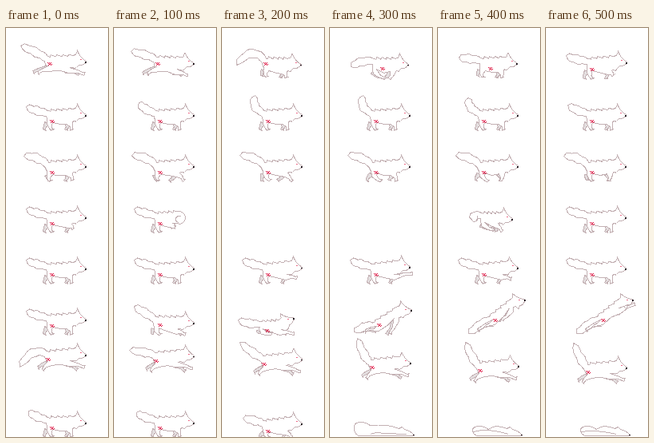
An HTML page for the animation above (0.6 s loop, 128x512 px).

```html
<!DOCTYPE html>
<html lang="en">
<head>
<meta charset="utf-8">
<title>Wolf moves</title>
<style>
html, body { margin: 0; width: 100%; height: 100%; overflow: hidden; background: #fff; }
svg { display: block; width: 128px; height: 512px; shape-rendering: crispEdges; }
.line { fill: #fff; stroke: #c3b0b3; stroke-width: 1; }
.far { fill: #e4dfe0; }
.open { fill: none; }
.mark { fill: none; stroke: #dc0d3c; stroke-width: 1; }
.nose { fill: #2a2228; }
.eye { fill: #ee6a88; }
</style>
</head>
<body>
<svg id="stage" viewBox="0 0 128 512"></svg>
<script>
const STEP = 100, STEPS = 6, CELL = 64;
const stage = document.getElementById("stage");

const add = (a, b, k = 1) => [a[0] + b[0] * k, a[1] + b[1] * k];
const mix = (a, b, t) => add(a, add(b, a, -1), t);
const unit = ([x, y]) => { const l = Math.hypot(x, y) || 1; return [x / l, y / l]; };
const side = ([x, y]) => [y, -x];
const ease = t => t * t * (3 - 2 * t);
const wave = t => Math.sin(Math.PI * t) ** 2;
const range = (n, f) => Array.from({ length: n }, (_, k) => f(k));

// Head outline from nape to throat, measured from the nose.
const HEAD = [[-17, -9], [-13, -10], [-11, -15], [-9, -11], [-7, -8], [-3, -4], [0, -2], [0, 0], [-5, 3], [-9, 3], [-12, 6]];

function turn([x, y], [nx, ny, deg = 0]) {
  const a = deg * Math.PI / 180, c = Math.cos(a), s = Math.sin(a);
  return [nx + x * c - y * s, ny + x * s + y * c];
}

const arc = (c, r, from, to) => range(13, k => turn([r, 0], [...c, from + (to - from) * k / 12]));

function shape(points, tag = "polygon", extra = "") {
  const list = points.map(p => p.map(v => v.toFixed(1)).join()).join(" ");
  return `<${tag} class="line ${extra}" points="${list}"/>`;
}

// One limb: down the front edge, round the paw, up the back edge.
function leg(top, foot, bend) {
  const out = side(unit(add(foot, top, -1)));
  const knee = add(mix(top, foot, .55), out, bend);
  return [add(top, out, 3), add(knee, out, 1.5), add(mix(knee, foot, .7), out, .8), add(foot, out, 2),
    add(foot, out, -2), add(knee, out, -2), add(top, out, -4)];
}

// Bushy tail: lower edge to the tip, then the upper edge back to the rump.
function brush(base, bend, tip) {
  const edge = s => range(10, k => {
    const t = k / 10;
    const a = mix(base, bend, t), b = mix(bend, tip, t);
    const width = 3.7 + 2 * Math.sin(Math.PI * t) - t + .7 * Math.sin(t * 17 + s);
    return add(mix(a, b, t), side(unit(add(b, a, -1))), s * width);
  });
  return [...edge(1), tip, ...edge(-1).reverse()];
}

function fur(a, b, up) {
  const tufts = range(4, k => {
    const p = mix(a, b, (k + .6) / 4.4);
    return [add(p, up, -1), add(add(p, [1, 0]), up, 1.6)];
  });
  return tufts.flat();
}

function stamp([x, y]) {
  const at = `${Math.round(x)} ${Math.round(y)}`;
  return `<path class="mark" d="M${at}m-2 -2l2 2l-2 2m2 -1l2 -3m-1 4l2 -2m-3 -2l1 1"/>`;
}

function face(nose) {
  const [ex, ey] = turn([-7, -4], nose);
  return `<rect class="nose" x="${nose[0] - 1.5}" y="${nose[1] - 1.5}" width="2" height="1.5"/>` +
    `<rect class="eye" x="${ex - .5}" y="${ey - .5}" width="2" height="1"/>`;
}

// Feet are near front, far front, near hind, far hind.
const REST = {
  hip: [55, 47], chest: [80, 47], nose: [100, 46], thick: 8,
  tip: [25, 34], bend: [38, 40],
  feet: [[82, 63], [75, 63], [58, 63], [48, 63]]
};

function wolf(change = {}) {
  const { hip, chest, nose, thick, tip, bend, feet, head, mark } = { ...REST, ...change };
  const along = unit(add(chest, hip, -1)), up = side(along);
  const front = add(chest, up, -thick), rear = add(hip, up, -thick);
  const rump = add(add(hip, up, thick - 3), along, -4);
  const crown = head || HEAD.map(p => turn(p, nose));
  const outline = [
    ...crown,
    add(add(chest, along, 7), up, -thick * .7), add(add(chest, along, 4), up, -thick * .6),
    ...leg(front, feet[0], 1),
    add(mix(front, rear, .5), up, -1),
    ...leg(rear, feet[2], -1.5),
    add(add(hip, along, -4), up, -thick * .5),
    ...brush(rump, bend, tip),
    ...fur(add(rump, up, 3), crown[0], up)
  ];
  return shape(leg(add(front, along, -3), feet[1], 1), "polygon", "far") +
    shape(leg(add(rear, along, -3), feet[3], -1.5), "polygon", "far") +
    shape(outline) + (head ? "" : face(nose)) +
    (mark === null ? "" : stamp(mark || add(hip, [2, 6])));
}

const withPaw = paw => ({ feet: [paw, ...REST.feet.slice(1)] });

function run(i) {
  if (i === 5) return wolf({ ...withPaw([84, 59]), nose: [101, 44], hip: [55, 46] });
  const g = wave(i / 6);
  const nose = [100 - 2 * g, 43 + 4 * Math.sin(Math.PI * i / 5)];
  const front = 98 - 24 * g, hind = 40 + 28 * g * g, ground = 57 + 6 * g;
  return wolf({
    nose, hip: [54 + 3 * g, 43 + 3 * g], chest: [79, nose[1] + 1],
    tip: [[18, 22], [21, 29], [18, 46], [26, 48], [26, 37]][i],
    bend: [36, i === 2 ? 20 : 28 + 12 * g],
    feet: [[front, ground], [front - 7, ground], [hind, ground - 1], [hind - 6, ground - 2]],
    mark: i < 3 ? [54, 45] : [65, 51]
  });
}

function wag(i) {
  const lift = Math.min(1, 1.3 * wave(i / 5.6));
  return wolf({ tip: mix([25, 34], [41, 20], lift), bend: mix([38, 40], [36, 35], lift) });
}

function walk(i) {
  const pace = (x, phase) => {
    const a = 2 * Math.PI * (i / STEPS + phase);
    return [x + 5 * Math.sin(a), 63 - Math.max(0, Math.cos(a))];
  };
  return wolf({
    tip: [22, 32 - Math.sin(Math.PI * i / 5)], bend: [38, 31],
    feet: [pace(83, 0), pace(74, .5), pace(59, .7), pace(51, .2)]
  });
}

function vanish(i) {
  if (i === 0) return wolf(withPaw([84, 59]));
  if (i === 1) {
    const hidden = [[76, 54], [76, 54]];
    return wolf({ head: arc([81, 45], 8, -110, 90), chest: [74, 47], feet: [...hidden, ...REST.feet.slice(2)] }) +
      shape(arc([81, 47], 4, 90, 300), "polyline", "open");
  }
  if (i < 4) return "";
  if (i === 5) return wolf();
  return wolf({
    hip: [57, 46], chest: [73, 47], nose: [93, 48], thick: 7, tip: [49, 48], bend: [38, 42],
    feet: [[80, 62], [73, 62], [70, 60], [66, 59]], mark: null
  });
}

function swipe(i) {
  const reach = Math.max(0, 1 - Math.abs(i - 2.9) / 1.9);
  return wolf({ ...withPaw(mix([82, 63], [104, 50], reach)), nose: [100, 46 - 2 * reach] });
}

// The jump climbs along a line once the crouch is released.
function leap(i) {
  if (i === 0) return wolf();
  if (i === 1) return wolf({
    hip: [54, 49], chest: [79, 51], nose: [100, 50], tip: [25, 28], bend: [37, 35],
    feet: [[89, 63], [84, 63], [58, 63], [48, 63]], mark: [57, 52]
  });
  if (i === 2) return wolf({
    hip: [50, 53], chest: [73, 54], nose: [90, 44, -32], thick: 6, tip: [20, 45], bend: [34, 51],
    feet: [[90, 62], [80, 62], [62, 62], [46, 62]], mark: [56, 59]
  });
  const rise = Math.min(1, i - 3), hip = mix([57, 52], [67, 44], rise);
  const paw = [[75, 62], [80, 45], [111, 25]][i - 3];
  const heel = mix([44, 59], [50, 58], rise);
  return wolf({
    hip, chest: mix([81, 41], [89, 29], rise), nose: [102 + 7 * rise, 34 - 13 * rise, -12 - 12 * rise],
    thick: 5, tip: mix([30, 60], [38, 62], rise), bend: mix([43, 52], [50, 52], rise),
    feet: [paw, add(paw, [-4, 1]), heel, add(heel, [-3, 0])], mark: mix([61, 52], [71, 46], rise)
  });
}

function drop(i) {
  const fall = ease(i / 5), y = 26 + 16 * fall;
  return wolf({
    nose: [100 + fall, y], hip: [54, y + 2], chest: [79, y + 1],
    tip: [[17, 40], [19, 19], [22, 9], [34, 4], [34, 9], [34, 10]][i],
    bend: i ? [38 + 7 * fall, y - 7] : [31, 14],
    feet: [[98, y + 14], [89, y + 17], [46, y + 18], [40, y + 15]],
    mark: [52, y + 5]
  });
}

function sleep(i) {
  if (i < 2) return wolf({ tip: [28, 31 + 2 * i], bend: [36, 39], nose: [100, 47] });
  if (i === 2) return wolf({
    hip: [55, 51], chest: [80, 50], nose: [100, 48], tip: [26, 40], bend: [39, 42],
    feet: [[87, 64], [77, 64], [59, 64], [47, 64]]
  });
  const curled = i > 3, x = curled ? 43 : 30, top = curled ? 50 : 45;
  const back = `M105 62H${x + 5}Q${x - 3} 57 ${x + 1} ${top + 2}Q${x + 9} ${top - 3} ${x + 20} ${top + 4}` +
    "Q72 47 86 53L90 51L93 54Q101 56 105 61Z";
  const fold = curled ? `M${x + 1} 57Q62 ${50 + 2 * i - 6} 88 60` : "M50 61Q52 57 68 59L96 60";
  return `<path class="line" d="${back}"/><path class="line open" d="${fold}"/>` +
    '<rect class="nose" x="103" y="60" width="2" height="1.5"/>';
}

const rows = [run, wag, walk, vanish, swipe, leap, drop, sleep];
let shown = -1;

function draw(now) {
  const i = Math.floor(now / STEP) % STEPS;
  if (i === shown) return;
  shown = i;
  stage.innerHTML = rows.map((pose, r) => `<g transform="translate(.5 ${r * CELL + .5})">${pose(i)}</g>`).join("");
}

const start = performance.now();
function tick() {
  draw(performance.now() - start);
  requestAnimationFrame(tick);
}
tick();
</script>
</body>
</html>
```
